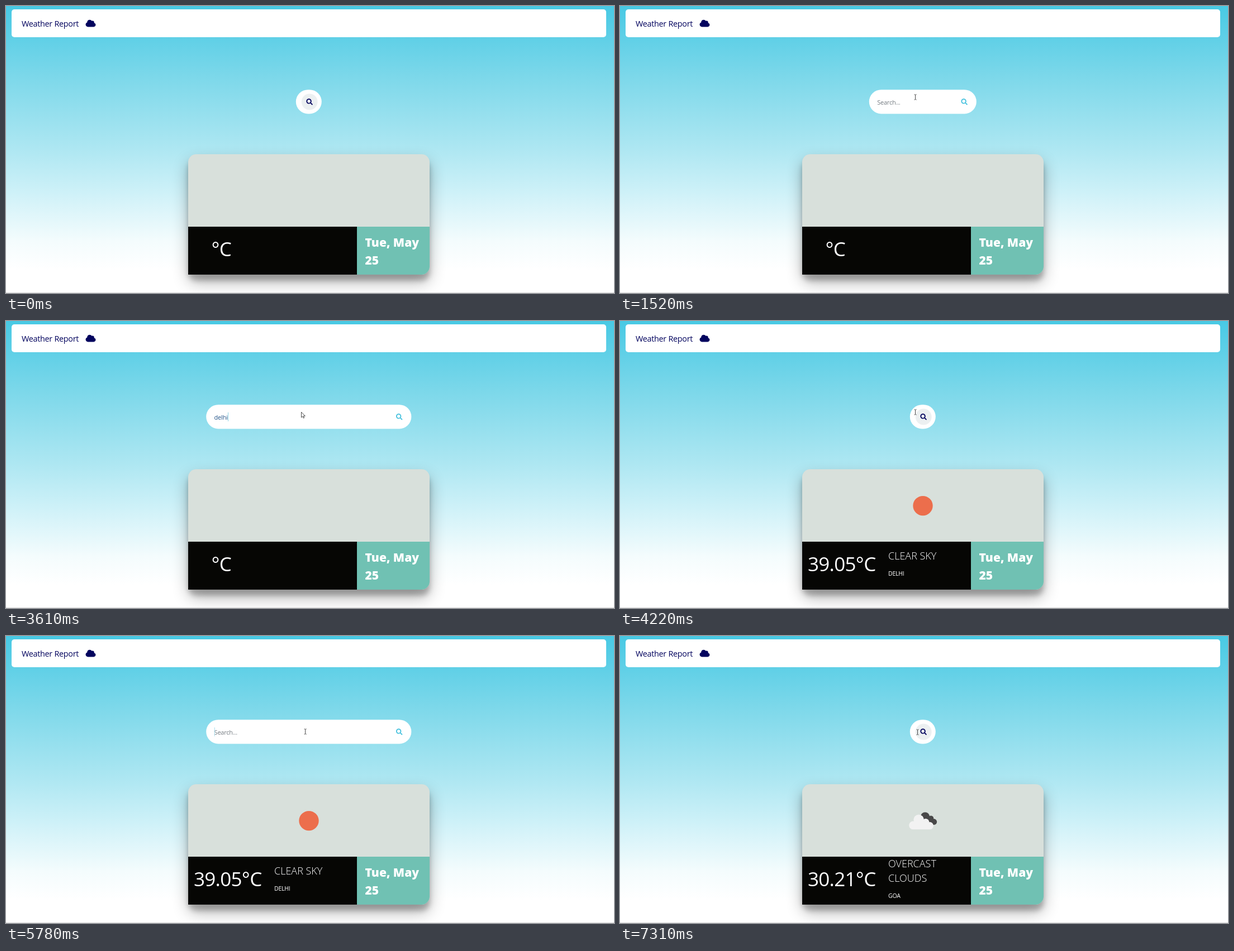
Recreate the animation shown at these times as an HTML page. Size 1088 by 515 pixels, loop 8 s.

```html
<!DOCTYPE html>
<html lang="en">
<head>
<meta charset="utf-8">
<title>Weather Report</title>
<style>
  html, body { margin: 0; width: 100%; height: 100%; overflow: hidden; }
  body {
    position: relative;
    background: linear-gradient(#48c9e4, #7dd8ea 25%, #aee7f2 50%, #cef1f8 65%, #f4fcfd 82%, #fff 92%);
  }
  div, body > svg { position: absolute; }
  body > svg { inset: 0; font-family: "Open Sans", "Noto Sans", sans-serif; }
  .nav { left: 10px; top: 6px; width: 1064px; height: 50px; border-radius: 5px; background: #fff; }
  .card {
    left: 326px; top: 266.4px; width: 431.5px; height: 216px;
    border-radius: 14.4px; background: #d8e0db;
    box-shadow: 0 13.7px 27.4px rgba(0,0,0,.3), 0 10.8px 8.6px rgba(0,0,0,.22);
  }
  .reading { left: 0; top: 129.6px; width: 302px; bottom: 0; background: #060604; }
  .date { left: 302px; top: 129.6px; right: 0; bottom: 0; background: #70c1b3; border-radius: 0 0 14.4px 0; }
  .footer { left: 0; right: 0; top: 514px; height: 1px; background: #dcdcdc; }
  .tight { letter-spacing: -.02em; }
  .sky { font-size: 18px; font-weight: 300; }
</style>
</head>
<body>
<div class="nav"></div>
<div class="card"><div class="reading"></div><div class="date"></div></div>
<div class="footer"></div>

<svg width="1088" height="515" fill="#fff">
  <g fill="#03045e">
    <text class="tight" x="28" y="37" font-size="14.4" font-weight="500">Weather Report</text>
    <path transform="translate(142.5 23.9) scale(.0281)" d="M537.6 226.6c4.1-10.7 6.4-22.4 6.4-34.6 0-53-43-96-96-96-19.7 0-38.1 6-53.3 16.2C367 64.2 315.3 32 256 32c-88.4 0-160 71.6-160 160 0 2.7.1 5.4.2 8.1C40.2 219.8 0 273.2 0 336c0 79.5 64.5 144 144 144h368c70.7 0 128-57.3 128-128 0-61.9-44-113.6-102.4-125.4z"/>
  </g>

  <rect id="pill" y="150.2" height="43.2" rx="21.6"/>
  <svg id="field" y="150" height="44">
    <text id="query" class="tight" y="27" font-size="11"></text>
    <rect id="caret" y="14" width="1" height="16" fill="#8fd3e6"/>
  </svg>
  <g id="button">
    <circle id="disc" r="14.4" fill="#ecf0f1"/>
    <path id="lens" transform="translate(-5.8 -5.8) scale(.0225)" d="M505 442.7L405.3 343c-4.5-4.5-10.6-7-17-7H372c27.6-35.3 44-79.7 44-128C416 93.1 322.9 0 208 0S0 93.1 0 208s93.1 208 208 208c48.3 0 92.7-16.4 128-44v16.3c0 6.4 2.5 12.5 7 17l99.7 99.7c9.4 9.4 24.6 9.4 33.9 0l28.3-28.3c9.4-9.4 9.4-24.6.1-34zM208 336c-70.7 0-128-57.2-128-128 0-70.7 57.2-128 128-128 70.7 0 128 57.2 128 128 0 70.7-57.2 128-128 128z"/>
  </g>

  <circle id="sun" cx="542" cy="331.6" r="17.7" fill="#ec6e4c"/>
  <g id="clouds">
    <g fill="#484848">
      <circle cx="546" cy="324.2" r="8"/><circle cx="556.3" cy="327.3" r="4.9"/>
      <circle cx="561.8" cy="333.4" r="5.3"/><path d="M546 325h11l5 13.7h-16z"/>
    </g>
    <g fill="#f2f2f2">
      <circle cx="524.6" cy="339.7" r="7.4"/><circle cx="534.6" cy="329.8" r="9.3"/>
      <circle cx="547" cy="334" r="6.2"/><circle cx="554.2" cy="340.4" r="6.7"/>
      <path d="M524.6 333h24l6 7v7.1h-30z"/>
    </g>
  </g>

  <text id="temp" class="tight" y="449" font-size="35"></text>
  <text id="sky1" class="sky" x="480"></text>
  <text id="sky2" class="sky" x="480" y="441"></text>
  <text id="city" class="tight" x="480" font-size="10.5"></text>
  <g font-size="21" font-weight="800">
    <text x="642.5" y="432">Tue, May</text>
    <text x="642.5" y="464">25</text>
  </g>

  <g id="cursor">
    <path id="arrow" d="M0 0v9.6l2.3-2.1 1.5 3.3 1.5-.7-1.5-3.2h3z" stroke="#222" stroke-width=".8"/>
    <path id="beam" d="M-2-4.6h1.4L0-4l.6-.6H2M0-4v8M-2 4.6h1.4L0 4l.6.6H2" fill="none" stroke="#333" stroke-width=".9"/>
  </g>
</svg>

<script>
const LOOP = 8000, CENTER = 541.8, OPEN_MS = 400;
const el = Object.fromEntries([...document.querySelectorAll('[id]')].map(e => [e.id, e]));
const set = (e, attrs) => { for (const k in attrs) e.setAttribute(k, attrs[k]); };
const show = (e, on) => { e.style.display = on ? '' : 'none'; };
const between = (t, ...spans) => spans.some(([a, b]) => t >= a && t < b);
const hold = (t, anchor, step) => anchor + Math.floor((t - anchor) / step) * step;
const latest = (list, t) => list.filter(item => item[0] <= t).pop();

// time, x, y
const path = [
  [170, 1002, 504], [450, 800, 372], [680, 560, 316], [890, 449, 362],
  [980, 452, 358], [1300, 528.5, 163.5], [4880, 528.5, 163.5],
  [5090, 541, 170], [5640, 540.5, 170], [5780, 532.5, 172.5], [LOOP, 532.5, 172.5]
];
const typed = [
  [0, ''], [2530, 'd'], [2600, 'de'], [2800, 'del'], [3080, 'delh'], [3150, 'delhi'],
  [4150, ''], [6310, 'g'], [6450, 'go'], [6580, 'goa']
];
const reports = [
  [0, '°C', '', '', ''],
  [4150, '39.05°C', 'CLEAR SKY', '', 'DELHI'],
  [7310, '30.21°C', 'OVERCAST', 'CLOUDS', 'GOA']
];

function cursorAt(t) {
  const i = Math.max(1, path.findIndex(p => p[0] >= t));
  const [t0, x0, y0] = path[i - 1], [t1, x1, y1] = path[i];
  const u = Math.max(0, (t - t0) / (t1 - t0));
  const s = u * u * (3 - 2 * u);
  return [x0 + (x1 - x0) * s, y0 + (y1 - y0) * s];
}

function drawSearch(t, tick) {
  const start = t < 4150 ? 1336 : 4960;
  const hover = tick > start && t < 7310;
  const progress = Math.min(1, (tick - start) / OPEN_MS);
  const width = hover ? 43.2 + Math.max(14.4, 324 * progress) : 46;
  const left = CENTER - width / 2;
  set(el.pill, { x: left, width });
  set(el.field, { x: left + 14.4, width: Math.max(0, width - 57.6) });
  show(el.field, hover);
  set(el.button, { transform: `translate(${left + width - 21.6} 172)` });
  show(el.disc, !hover);
  set(el.lens, { fill: hover ? '#48c2de' : '#03045e' });

  const text = latest(typed, t)[1];
  el.query.textContent = text || 'Search...';
  set(el.query, { fill: text ? '#24558a' : '#757c82' });
  show(el.caret, between(t, [1690, 2190], [2530, 3750], [5560, 6050], [6310, 7130]));
  set(el.caret, { x: text && hover ? el.query.getComputedTextLength() + .3 : 0 });
}

function drawReport(t) {
  const [, temp, sky1, sky2, city] = latest(reports, t);
  Object.entries({ temp, sky1, sky2, city }).forEach(([id, text]) => { el[id].textContent = text; });
  set(el.temp, { x: sky1 ? 336 : 367.5 });
  set(el.sky1, { y: sky2 ? 415 : 428 });
  set(el.city, { y: sky2 ? 470 : 457 });
  show(el.sun, between(t, [4220, 7310]));
  show(el.clouds, t >= 7310);
}

function draw(now) {
  const t = now % LOOP;
  const tick = t < 4000 ? hold(t, 1320, 66.6) : hold(t, 4950, 70);
  drawSearch(t, tick);
  drawReport(t);
  const arrow = between(t, [170, 1300], [3610, 4150], [6840, 7310]);
  set(el.cursor, { transform: `translate(${cursorAt(tick)})` });
  show(el.cursor, t >= 170);
  show(el.arrow, arrow);
  show(el.beam, !arrow);
  requestAnimationFrame(() => draw(performance.now()));
}
draw(performance.now());
</script>
</body>
</html>
```
